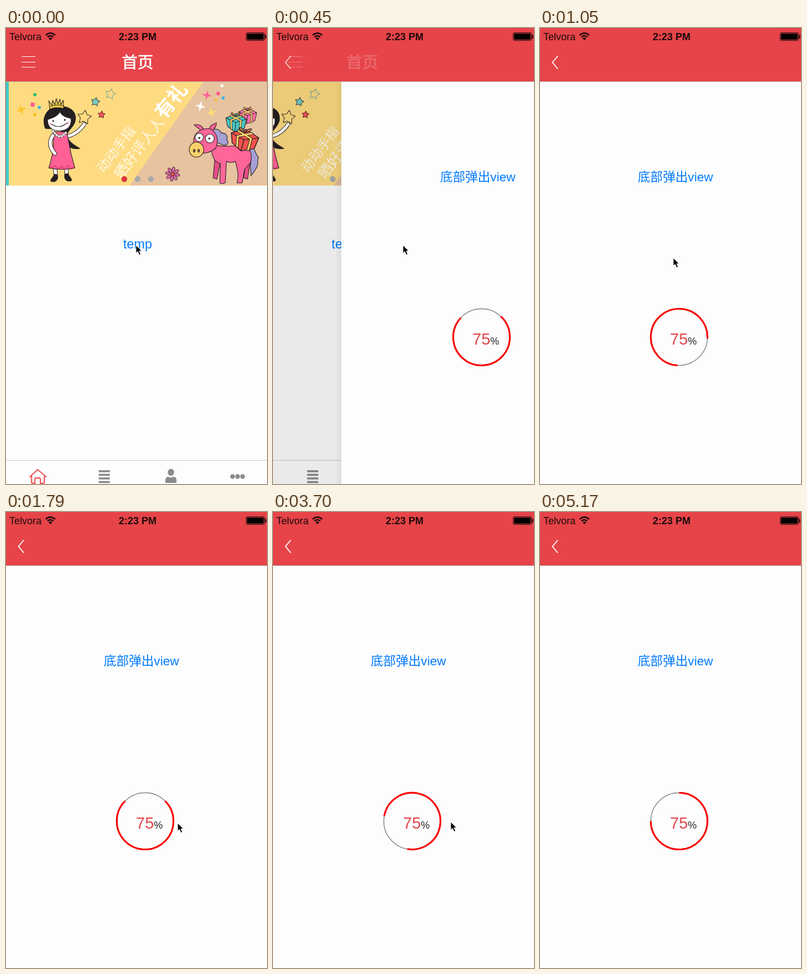
An HTML page that plays this animation: 470x821 px, repeating every 5.6 s.

```html
<!DOCTYPE html>
<html lang="zh">
<head>
<meta charset="utf-8">
<style>
html, body { margin: 0; width: 100%; height: 100%; overflow: hidden; background: #fdfdfd; }
svg { display: block; font-family: "Liberation Sans", "Noto Sans CJK SC", "Noto Sans CJK", sans-serif; }
.cjk { font-family: "Noto Sans CJK SC", "Noto Sans CJK", sans-serif; }
.ink { stroke: #2b2226; stroke-width: 1.1; stroke-linejoin: round; stroke-linecap: round; }
.line { fill: none; stroke-linecap: round; stroke-linejoin: round; }
</style>
</head>
<body>
<svg width="470" height="821" viewBox="0 0 470 821">
  <defs>
    <linearGradient id="shade"><stop offset="0" stop-opacity="0.06"/><stop offset="1" stop-opacity="0.2"/></linearGradient>
    <clipPath id="strip"><rect x="-20" y="96" width="510" height="187.5"/></clipPath>
    <g id="gift" class="ink">
      <path d="M-18 -6 L1 -14 L19 -4 L15 13 L-2 19 L-15 9Z"/>
      <path d="M-18 -6 L0 2 L19 -4 M0 2 L-2 19" fill="none"/>
      <path d="M-9 -10 L9 -1 L7 16 M9 -9 L-9 -2 L-8 13" fill="none" stroke-width="4"/>
      <path d="M-9 -10 L9 -1 L7 16 M9 -9 L-9 -2 L-8 13" fill="none" stroke="#f8d56c" stroke-width="2.4"/>
      <path d="M0 -9 C-14 -13 -8 -21 0 -9 C6 -21 14 -15 0 -9Z" fill="#f59a4e"/>
    </g>
  </defs>

  <rect width="470" height="821" fill="#fdfdfd"/>
  <g id="home">
    <g id="banner" clip-path="url(#strip)">
      <rect x="-20" y="96" width="25" height="188" fill="#42c8cb"/>
      <rect x="5" y="96" width="485" height="188" fill="#fedb80"/>
      <path d="M355.7 96 H490 V284 H222.3Z" fill="#e7c39f"/>

      <g id="bits"></g>

      <!-- girl -->
      <g class="ink">
        <path d="M71 181 C62 158 78 140 97 141 C117 141 127 152 125 166 C123 179 108 186 110 195 C114 207 124 211 133 217 C120 219 109 214 104 205 L98 182Z" fill="#241f22"/>
        <path d="M88 250 L90 268 M109 250 L109 266" stroke-width="7.5"/>
        <path d="M88 250 L90 268 M109 250 L109 266" stroke="#fff" stroke-width="5.5"/>
        <path d="M92 264 L87 263 C86 269 79 272 81 276 C86 278 92 276 93 270Z M106 263 L112 262 C113 268 119 270 118 275 C110 277 104 274 106 263Z" fill="#241f22"/>
        <path d="M111 195 C123 192 133 185 141 173" class="line" stroke-width="7"/>
        <path d="M111 195 C123 192 133 185 141 173" class="line" style="stroke:#fff;stroke-width:5"/>
        <path d="M86 187 H109 C113 198 112 212 124 252 Q101 257 77 252 C84 231 88 207 84 192Z" fill="#ff6096"/>
        <path d="M79 249 q3 5 6 1 t6 1 t6 0 t6 1 t6 -1 t6 0 t6 -1" fill="none" stroke="#c62b65"/>
        <path d="M84 194 C77 205 79 216 88 226" class="line" stroke-width="7.5"/>
        <path d="M84 194 C77 205 79 216 88 226" class="line" style="stroke:#fff;stroke-width:5.5"/>
        <path d="M75 165 C82 162 92 160 97 151 C102 160 111 161 117 163 C119 178 109 185 96 185 C83 186 74 177 75 165Z" fill="#fff"/>
        <path d="M85 167 v1 M106 165 v1" stroke-width="2.6"/>
        <path d="M82 173 Q96 183 110 171" fill="none"/>
        <path d="M79 146 L77 131 L83 139 L84 130 L88 138 L90.5 127 L93.5 137 L97 128 L99 138 L103 130 L104 145 Q91 141 79 146Z" fill="#f0ce4a"/>
        <path d="M80 141 Q91 137 103 140" fill="none"/>
      </g>
      <path d="M79 173 h3 M110 171 h3" stroke="#ff8fb0" stroke-width="3"/>
      <path d="M85 186 Q96 204 110 186" class="line" stroke="#555" stroke-width="5.5" stroke-dasharray="0 4.7"/>
      <path d="M85 186 Q96 204 110 186" class="line" stroke="#fff" stroke-width="4" stroke-dasharray="0 4.7"/>

      <!-- slogan -->
      <g class="cjk" fill="#fff">
        <g font-weight="100" opacity=".8">
          <text transform="translate(176 262) rotate(-53)" font-size="24">动动手指</text>
          <text transform="translate(208 273) rotate(-53)" font-size="26">晒好评人人</text>
        </g>
        <text transform="translate(285 166) rotate(-51)" font-size="35" font-weight="900">有礼</text>
      </g>

      <!-- horse -->
      <g class="ink" fill="#ff6599">
        <path d="M437 214 C450 212 447 226 455 233 C451 239 456 248 450 253 C447 260 443 263 441 266 C442 255 438 250 441 242 C436 233 444 226 437 214Z" fill="#a5a0d5"/>
        <path d="M369 183 C380 180 386 184 387 189 C396 188 401 196 397 201 C403 206 398 212 392 211 L380 206Z" fill="#a5a0d5"/>
        <path d="M376 236 L373 270 L380 272 L386 240Z M424 238 L431 248 L428 270 L435 272 L440 240Z" fill="#e64d86"/>
        <path d="M367 205 C378 215 398 213 423 212 C442 213 444 230 440 243 L430 254 C427 263 428 270 425 279 H416 C420 262 416 252 413 240 C407 243 402 243 397 240 L395 278 Q390 282 385 279 L386 244 C374 241 371 230 370 220Z"/>
        <path d="M350 184 C344 177 341 178 339 174 C347 173 354 176 356 183 M366 183 C367 174 374 173 379 171 C379 178 374 183 370 187"/>
        <path d="M338 209 C336 190 349 181 364 181 C379 183 384 201 378 216 C369 224 356 228 343 224Z"/>
        <ellipse cx="343" cy="219" rx="13" ry="13.5" fill="#f8d169"/>
        <ellipse cx="339" cy="221" rx="1.6" ry="2.4" fill="#a8783a"/><ellipse cx="347" cy="221" rx="1.6" ry="2.4" fill="#a8783a"/>
        <circle cx="348" cy="197" r="7.5" fill="#fff"/><circle cx="367" cy="199" r="8" fill="#fff"/>
        <path d="M348 198 h.1 M366 199 h.1" stroke-width="3.6"/>
      </g>
      <use href="#gift" transform="translate(435 156) scale(.87)" fill="#ff6fa6"/>
      <use href="#gift" transform="translate(414 168)" fill="#46c7c2"/>
      <use href="#gift" transform="translate(429 199) rotate(8) scale(1.36 1.2)" fill="#f5524c"/>
    </g>

    <g id="dots"><circle cx="213" cy="272" r="5.2"/><circle cx="237" cy="272" r="5.2"/><circle cx="261" cy="272" r="5.2"/></g>
    <text x="237" y="397" font-size="23.3" text-anchor="middle" fill="#007aff">temp</text>

    <path d="M-10 778.5 H610" stroke="#c9c9c9"/>
    <path d="M43 808 L57 795 L72 808 M46 807 V817 Q46 820 49 820 H52 V813 Q52 810 55 810 H59 Q62 810 62 813 V820 H66 Q69 820 69 817 V807" class="line" stroke="#ee5a5e" stroke-width="2.3"/>
    <path d="M167 798 H187 M167 804.5 H187 M167 811 H187 M167 817.5 H187" stroke="#888" stroke-width="3.6"/>
    <g fill="#8b8b8b">
      <ellipse cx="297" cy="800" rx="5.7" ry="6.2"/>
      <path d="M287 819 V813 Q288 808 293 808 Q297 811 301 808 Q306 808 307 813 V819Z"/>
      <circle cx="408" cy="807.5" r="4.2"/><circle cx="417" cy="807.5" r="4.2"/><circle cx="426" cy="807.5" r="4.2"/>
    </g>
  </g>
  <rect id="dim" y="97" width="470" height="724"/>

  <g id="edge">
    <rect id="shadow" x="-9" y="97" width="9" height="724" fill="url(#shade)"/>
    <rect y="97" width="480" height="724" fill="#fdfdfd"/>
  </g>
  <g id="page">
    <text x="176" y="276" font-size="22.6" fill="#007aff">底部弹出view</text>
    <circle cx="250.5" cy="556.5" r="51" fill="none" stroke="#868686" stroke-width="1.5"/>
    <circle id="arc" cx="250.5" cy="556.5" r="51" fill="none" stroke="#f80303" stroke-width="3.2" pathLength="360" stroke-dasharray="270 90"/>
    <text x="234" y="570" font-size="29" fill="#e0484d">75<tspan font-size="18" fill="#222">%</tspan></text>
  </g>

  <rect width="470" height="96" fill="#e64449"/>
  <rect y="96" width="470" height="1" fill="#b9a3a3"/>
  <path id="menu" d="M28 51.5 H53 M28 61.5 H53 M28 70.5 H53" stroke="#fff" stroke-width="1.1"/>
  <text id="title" class="cjk" x="237" y="72" font-size="28.5" text-anchor="middle" fill="#fff" stroke="#fff" stroke-width=".7">首页</text>
  <path id="back" d="M32 50.5 L22.5 62 L32 73.5" fill="none" stroke="#fff" stroke-width="1.8"/>

  <g font-size="18">
    <text x="6" y="22" fill="#1c0a0b">Telvora</text>
    <text x="237" y="22" font-weight="bold" text-anchor="middle" fill="#1c0a0b">2:23 PM</text>
  </g>
  <g fill="none" stroke="#14090a" stroke-width="2.5">
    <path d="M71.5 13 Q80 5.5 88.5 13 M74.8 16.2 Q80 11.7 85.2 16.2"/>
    <path d="M80 22 L76.7 18.5 Q80 15.8 83.3 18.5Z" fill="#14090a" stroke="none"/>
    <rect x="432.5" y="8.5" width="33" height="14" rx="2.5" stroke-width="1"/>
    <rect x="434" y="10" width="30" height="11" rx="1" fill="#000" stroke="none"/>
    <path d="M467.5 12.5 V19" stroke-width="2"/>
  </g>
  <path id="cursor" d="M0 0 V14.5 L3.3 11.4 L6 17.5 L8.7 16.3 L6.1 10.4 H10.6Z" fill="#000" stroke="#fff" stroke-width="1"/>
</svg>
<script>
const LOOP = 5600, TICK = 147.5, LAST = 35;
const $ = id => document.getElementById(id);
const move = (id, x, y = 0) => $(id).setAttribute('transform', `translate(${x} ${y})`);

// Star with n points: outer radius R, inner radius r
function star(x, y, R, r, n, fill, stroke = 'none', turn = 0) {
  let pts = '';
  for (let i = 0; i < 2 * n; i++) {
    const a = Math.PI * i / n + turn, d = i % 2 ? r : R;
    pts += `${x + d * Math.sin(a)},${y - d * Math.cos(a)} `;
  }
  return `<polygon points="${pts}" fill="${fill}" stroke="${stroke}" stroke-width="1.2" stroke-linejoin="round"/>`;
}
const chip = (x, y, size, fill, turn) =>
  `<rect x="${-size / 2}" y="${-size / 2}" width="${size}" height="${size}" fill="${fill}" transform="translate(${x} ${y}) rotate(${turn})"/>`;

let flower = '';
for (let a = 0; a < 360; a += 45)
  flower += `<ellipse cx="300" cy="255" rx="2.5" ry="5" fill="#dd6aa5" stroke="#553044" transform="rotate(${a + 10} 300 263)"/>`;
$('bits').innerHTML = [
  star(27, 147, 10, 3.3, 4, '#fdc72e', 'none', -.3), chip(52, 120, 5, '#18bb6b', 30), chip(48, 138, 7, '#ff5b92', 15),
  chip(60, 143, 5, '#2bb8e8', 5), chip(52, 156, 5, '#f9bd18', 30),
  star(141, 161, 13, 7, 5, '#fedb80', '#4b4130', .15), star(161, 133, 8, 4.3, 5, '#79cfc4', '#4b5552', .2),
  star(188, 119, 9.5, 5, 5, 'none', '#89aa9a', .25), star(172, 156, 6.5, 3.5, 5, '#f4555d', '#7c3033', .1),
  star(362, 121, 9, 3, 4, '#ff6599', 'none', .2), star(350, 141, 10, 3, 4, '#fff', 'none', .2),
  star(370, 152, 10.5, 3.2, 4, '#ffdc73', 'none', -.3),
  chip(389, 104, 5, '#fff', 35), chip(382, 118, 6, '#ff5b92', 8), chip(391, 126, 5, '#2bb8e8', 25), chip(378, 130, 4, '#f9bd18', 20),
  flower, '<circle cx="300" cy="263" r="3.5" fill="#e4514f" stroke="#553044"/>'
].join('');

// Keys are [tick, value]; smooth adds tangents from the neighbours
function at(keys, k, smooth) {
  const end = keys.length - 1;
  if (k <= keys[0][0]) return keys[0][1];
  if (k >= keys[end][0]) return keys[end][1];
  const i = keys.findIndex(p => p[0] > k) - 1;
  const [t0, v0] = keys[i], [t1, v1] = keys[i + 1], h = t1 - t0, u = (k - t0) / h;
  if (!smooth) return v0 + (v1 - v0) * u;
  const slope = j => j < 1 || j >= end ? 0 : (keys[j + 1][1] - keys[j - 1][1]) / (keys[j + 1][0] - keys[j - 1][0]);
  return v0 + (v1 - v0) * u * u * (3 - 2 * u) + h * u * (1 - u) * (slope(i) * (1 - u) - slope(i + 1) * u);
}

const slide = [[1, 470], [2, 461], [3, 125], [4, 10], [5, 2], [6, 0]];
const spin = [[1, 0], [4, 80], [12, 405], [17, 870], [25, 1720], [35, 2160]];
const scroll = [[0, 0], [2, -8]];
const cursorX = [[6, 234], [7, 240], [10, 300], [12, 309], [15, 304], [17, 308], [25, 320], [29, 318], [31, 345], [33, 421]];
const cursorY = [[6, 391], [7, 414], [10, 560], [12, 560], [15, 628], [17, 562], [25, 558], [29, 650], [31, 690], [33, 790]];

const start = performance.now();
function draw() {
  // The screen refreshes in even ticks, with one tick held
  let k = Math.min(LAST, Math.floor((performance.now() - start) % LOOP / TICK));
  if (k === 30) k = 29;
  const x = at(slide, k), gone = 1 - x / 470;
  move('home', k < 2 ? 0 : -2 - 141 * gone);
  move('banner', at(scroll, k));
  [...$('dots').children].forEach((dot, i) => dot.setAttribute('fill', i === (k ? 1 : 0) ? '#dc3640' : '#aaa'));
  $('dim').setAttribute('opacity', .1 * gone);
  $('shadow').setAttribute('opacity', 1 - gone);
  move('edge', x - 2 + (k < 2 ? 12 : 0));
  move('page', x);
  $('arc').setAttribute('transform', `rotate(${at(spin, k, true) - 90} 250.5 556.5)`);
  move('title', k < 2 ? 0 : -5 - 100 * Math.max(0, gone - .02));
  $('title').setAttribute('opacity', at([[1, 1], [2, .8], [3, .2], [4, 0]], k));
  $('menu').setAttribute('opacity', at([[2, 1], [3, .3], [4, 0]], k));
  $('back').setAttribute('opacity', at([[2, 0], [3, .7], [4, 1]], k));
  move('cursor', at(cursorX, k), at(cursorY, k));
  $('cursor').setAttribute('opacity', k > 33 ? 0 : 1);
  requestAnimationFrame(draw);
}
draw();
</script>
</body>
</html>
```
